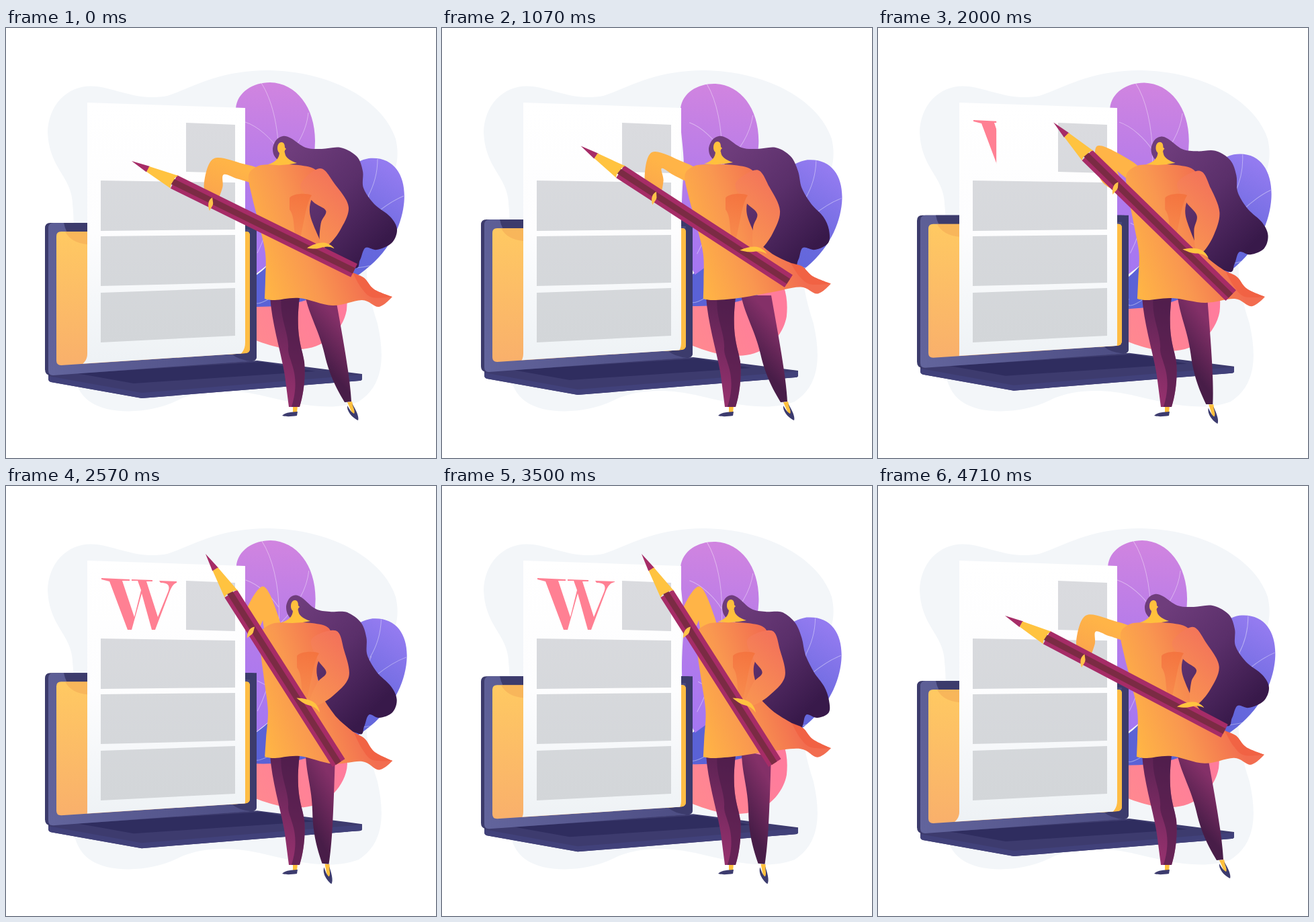
These frames come from a looping animation (640x640 px, 4780 ms). An HTML page:

```html
<!DOCTYPE html>
<html lang="en">
<head>
<meta charset="utf-8">
<title>Writing</title>
<style>
html, body { margin: 0; width: 100%; height: 100%; overflow: hidden; background: #fff; }
svg { display: block; width: 100vw; height: 100vh; }
.vein { fill: none; stroke: #fff; stroke-opacity: .4; stroke-width: 1; }
</style>
</head>
<body>
<svg viewBox="0 0 640 640">
<defs id="defs">
  <clipPath id="screenClip"><path id="clipShape" d="M0 0H640V466L0 507Z"/></clipPath>
  <clipPath id="letterClip"><rect id="wipe" x="140" y="130" width="118" height="90"/></clipPath>
</defs>

<path fill="#f3f6f9" d="M62 155C63 112 95 82 135 87C170 92 198 109 240 101C275 90 315 63 390 63C480 64 560 105 580 165C592 215 560 240 550 290C525 345 540 400 553 440C564 490 562 532 525 556C480 573 425 557 385 548C335 536 295 538 262 551C225 571 180 574 150 567C110 556 105 535 96 500C88 420 106 320 99 262C98 220 64 210 62 155Z"/>

<path id="pink" fill="url(#gPink)" d="M340 415L400 340H480C505 365 510 392 507 420C501 452 472 478 436 478C408 479 385 471 340 452Z"/>
<g id="blue">
  <path fill="url(#gBlue)" d="M340 384C420 365 470 206 540 194C584 190 600 230 590 275C580 320 545 372 450 404C412 416 380 416 340 414Z"/>
  <path class="vein" d="M553 195Q553 225 538 252M592 250Q572 258 548 278M522 357Q550 354 568 345M540 250Q520 310 440 370T372 400"/>
</g>
<g id="purple">
  <path fill="url(#gPurple)" d="M342 120C344 95 368 81 393 81C432 82 460 118 460 168C459 230 430 320 386 355L372 366C345 320 348 255 350 212C350 178 341 150 342 120Z"/>
  <path class="vein" d="M380 82C395 105 406 145 406 195C406 240 392 300 374 335M450 126C447 155 432 180 407 205M356 140C375 146 395 165 405 180M374 290L386 296"/>
</g>

<g id="laptop">
  <path fill="#3d3b6e" d="M63 516L374 495L530 515V522Q530 525 526 525L202 551L67 527Q63 526 63 522Z"/>
  <path fill="#41417a" d="M63 518L202 543L530 516V522Q530 525 526 525L202 551L67 527Q63 526 63 522Z"/>
  <path fill="#2f2d5f" d="M106 514L380 497L460 511L190 529Z"/>
  <path fill="#3c3b6c" d="M66 290H366Q373 290 373 297V488Q373 495 366 496L67 517Q58 517 58 508V298Q58 290 66 290Z"/>
  <path fill="url(#gFrame)" d="M71 290H362Q369 290 369 297V488Q369 495 362 496L70 517Q63 517 63 510V298Q63 290 71 290Z"/>
  <path fill="#3c3b6c" d="M86 290H373V490Q373 495 366 496Q345 494 336 485L363 300H121V322Q92 320 86 290Z"/>
  <path fill="url(#gScreen)" d="M82 303H358Q363 303 363 309V477Q363 483 357 484L82 502Q75 502 75 495V310Q75 303 82 303Z"/>
  <path fill="#ffbd45" d="M330 303H358Q363 303 363 309V477Q363 483 357 484L330 486Z"/>
  <path fill="#f0a050" opacity=".45" d="M88 303H121V322Q97 320 88 303Z"/>
</g>

<g clip-path="url(#screenClip)">
  <path fill="url(#gPage)" d="M121 111L356 119V468C356 479 351 485 343 490L98 510C114 502 121 496 121 485Z"/>
  <path fill="url(#gBox)" d="M268 141L341 144V216L268 214ZM141 227L341 230V300L141 302ZM141 310L341 308V379L141 384ZM141 394L341 387V458L141 468Z"/>
  <path clip-path="url(#letterClip)" fill="#ff8093" d="M142 137L184 139V141L173 141L191 195L201 155L196 141L187 141V139L218 140V142L209 142L226 195L241 158C245 148 241 144 230 144L228 141L257 142V143C250 144 247 149 244 156L222 214L217 214L202 160L187 214L181 214L154 142L142 139Z"/>
</g>

<path id="hair" fill="url(#gHair)"/>
<path fill="#ffc03d" d="M427 562H434L433 573H427Z"/>
<path fill="#3c3b6e" d="M411 577C417 571 426 572 434 571L433 577C426 578 418 579 411 577Z"/>
<g id="leg">
  <path fill="#ffc03d" d="M508 557L515 556L520 575L515 573Z"/>
  <path fill="#3c3b6e" d="M508 562C507 572 517 581 524 584C526 578 520 567 515 559C517 565 520 571 518 574C514 572 511 567 508 562Z"/>
  <path fill="url(#gLegR)" d="M445 398C452 430 466 450 474 485C482 520 494 540 504 557L514 556C512 520 503 470 490 398Z"/>
</g>
<path fill="url(#gLegL)" d="M393 400C396 445 412 490 416 525L421 564H437C443 545 446 520 444 497C441 475 430 460 437 400Z"/>
<path fill="#4a1c48" opacity=".6" d="M410 400C406 430 422 455 420 478C420 495 440 515 425 564H437C443 545 446 520 444 497C441 475 430 460 437 400Z"/>
<path id="armL" fill="url(#gArm)"/>
<path id="dress" fill="url(#gDress)"/>
<path id="tail" fill="#f05f40" opacity=".75"/>
<path id="armR" fill="url(#gSleeve)"/>
<path id="fold" fill="url(#gFold)" d="M422 253C426 246 448 245 455 249C446 262 444 290 437 316C424 310 433 285 422 270Z"/>
<g id="head" fill="#ffc03d">
  <path d="M390 203Q407 198 407 185L415 185Q415 195 433 201Q412 206 390 203Z"/>
  <path d="M404 179C404 173 407 170 410 170C414 170 415 174 415 178L417 180L415 182C415 186 412 188 409 187C406 186 404 183 404 179Z"/>
</g>
<g id="pencil">
  <path fill="#a62c67" d="M0 0L28 -5L27 5ZM70 -11H369V11H70Z"/>
  <path fill="#ffc340" d="M27 -4.5L72 -11Q67 -6 70 0Q66 6 70 11L27 4.5Z"/>
  <path fill="#7b2b44" d="M69 -4H369V5H68Z"/>
</g>
<path id="handL" fill="#ffc34a" d="M-2 -8C-9 -4 -9 5 -6 12C-4 7 0 4 -1 -1Z"/>
<path id="handR" fill="#ffc340" d="M-25 2C-15 -2 -4 -4 4 -1C10 2 14 6 15 9C8 4 2 4 -5 5C-12 6 -18 4 -25 2Z"/>
</svg>

<script>
const T = 4780;
const $ = id => document.getElementById(id);
const clamp = v => Math.min(1, Math.max(0, v));

// Gradients: id, x1 y1 x2 y2, then colours spread evenly
function grad(id, [x1, y1, x2, y2], ...colors) {
  const stops = colors.map((c, i) => `<stop offset="${i / (colors.length - 1)}" stop-color="${c}"/>`).join('');
  $('defs').insertAdjacentHTML('beforeend',
    `<linearGradient id="${id}" gradientUnits="userSpaceOnUse" x1="${x1}" y1="${y1}" x2="${x2}" y2="${y2}">${stops}</linearGradient>`);
}
grad('gPink', [480, 400, 380, 470], '#ff7c9c', '#ff8890');
grad('gBlue', [560, 200, 440, 400], '#937bf0', '#6668dd', '#5a62d6');
grad('gPurple', [400, 85, 385, 360], '#d084e0', '#b47bea', '#a577f2');
grad('gFrame', [63, 500, 373, 400], '#62649c', '#4a4a80');
grad('gScreen', [90, 303, 100, 500], '#ffc962', '#f9b06b');
grad('gPage', [0, 111, 0, 495], '#fff', '#fdfdfe', '#eef2f5');
grad('gBox', [0, 141, 0, 468], '#dadbdf', '#d3d6d9');
grad('gHair', [425, 180, 560, 320], '#6f3d7c', '#5a2f6a', '#38194a');
grad('gLegL', [440, 410, 405, 545], '#5c2354', '#92306c');
grad('gLegR', [500, 440, 455, 480], '#843068', '#481d48');
grad('gArm', [360, 215, 320, 300], '#ffb447', '#f89a50');
grad('gDress', [372, 350, 510, 300], '#ffb545', '#f99750', '#f26d50');
grad('gSleeve', [420, 310, 500, 230], '#fa9a50', '#f3735a');
grad('gFold', [430, 310, 450, 245], '#f78a4c', '#f4733f');

// Points "x,y"; a trailing "!" marks a sharp corner
const pts = s => s.split(' ').map(p => [...p.replace('!', '').split(',').map(Number), p.endsWith('!') ? 0 : 1]);

// Closed smooth curve through the points
function spline(p) {
  const n = p.length, at = i => p[(i + n) % n];
  const tan = (i, j) => (at(i + 1)[j] - at(i - 1)[j]) / 6 * (at(i)[2] ?? 1);
  let d = `M${p[0][0]} ${p[0][1]}`;
  for (let i = 0; i < n; i++) {
    const a = at(i), b = at(i + 1);
    d += `C${a[0] + tan(i, 0)} ${a[1] + tan(i, 1)} ${b[0] - tan(i + 1, 0)} ${b[1] - tan(i + 1, 1)} ${b[0]} ${b[1]}`;
  }
  return d + 'Z';
}

// Eased values through [time, ...values] keys
function track(t, ...keys) {
  const i = keys.findIndex(k => t < k[0]);
  if (i < 1) return keys.at(i).slice(1);
  const a = keys[i - 1], b = keys[i], x = (t - a[0]) / (b[0] - a[0]);
  return a.slice(1).map((v, j) => v + (b[j + 1] - v) * x * x * (3 - 2 * x));
}

// Plane vectors
const add = (p, v, k = 1) => [p[0] + v[0] * k, p[1] + v[1] * k];
const mid = (p, q) => [(p[0] + q[0]) / 2, (p[1] + q[1]) / 2];
const unit = v => { const l = Math.hypot(...v) || 1; return [v[0] / l, v[1] / l]; };
const dir = (p, q) => unit(add(q, p, -1));

// Tapered two-bone limb; the elbow follows from the shoulder and the wrist.
// radii: shoulder, upper arm, elbow, forearm, wrist
function limb(shoulder, wrist, upper, lower, radii, inner) {
  const d = Math.hypot(wrist[0] - shoulder[0], wrist[1] - shoulder[1]);
  const along = (upper ** 2 - lower ** 2 + d * d) / (2 * d);
  const out = Math.sqrt(Math.max(0, upper ** 2 - along ** 2));
  const [ux, uy] = dir(shoulder, wrist);
  const elbow = add(add(shoulder, [ux, uy], along), [uy, -ux], out * bendSide(ux));
  const side = bendSide(ux);
  const normal = (p, q) => { const [x, y] = dir(p, q); return [y * side, -x * side]; };
  const n1 = normal(shoulder, elbow), n2 = normal(elbow, wrist), ne = unit(add(n1, n2));
  const spine = [shoulder, mid(shoulder, elbow), elbow, mid(elbow, wrist), wrist];
  const normals = [n1, n1, ne, n2, n2];
  const edge = k => spine.map((p, i) => add(p, normals[i], radii[i] * k));
  return [...edge(1), ...edge(-inner).reverse()];
}
const bendSide = () => 1;

const hair = pts('403,195 397,181 402,167 412,161 424,164 446,178 470,180 498,178 522,191 531,213 532,238 548,262 572,281 582,300 574,320 552,330 535,327 527,345 518,357 470,330 425,210');
const dress = pts('392,203 372,207 361,220 366,250 376,290 386,335 386,375 385,403! 400,405 437,402 486,413 530,405 555,415 575,400! 548,389 533,372 516,364 490,345 470,321! 453,280 455,254 468,235 462,212 435,204');

// The head end of the hair leans, the loose end drops and ripples
const waveHair = (lean, sway) => hair.map(([x, y]) => {
  const u = clamp((x - 397) / 185);
  const ripple = Math.cos(2 * Math.PI * (y - 193) / 100);
  return [x + 20 * lean * (1 - u) - 7 * sway * u * u * ripple, y + 18 * lean * u];
});

// Shoulders lean over a fixed hem; the train flutters
const waveDress = (lean, sway) => dress.map(([x, y, k]) => {
  const v = clamp((y - 204) / 195), low = clamp((y - 320) / 60);
  return [
    x + 20 * lean * (1 - v) ** 1.5 + 4 * sway * v,
    y + low * (10 * lean * clamp((x - 470) / 100) - 20 * sway * clamp((x - 440) / 45)),
    k];
});

const draw = (id, p) => $(id).setAttribute('d', spline(p));
const move = (id, x, y, a = 0) => $(id).setAttribute('transform', `translate(${x} ${y}) rotate(${a})`);
const turn = (id, a, x, y) => $(id).setAttribute('transform', `rotate(${a} ${x} ${y})`);

function render(t) {
  const phase = 2 * Math.PI * t / T;
  const sway = (1 - Math.cos(2 * phase)) / 2;
  const [lean] = track(t, [0, 0], [1600, 0], [2430, 1], [3900, 1], [4650, 0], [T, 0]);
  const [shown] = track(t, [0, 0], [1600, 0], [2690, 1], [4070, 1], [4640, 0], [T, 0]);
  const [px, py, angle] = track(t,
    [0, 187, 198, 26.2], [710, 205, 152, 41.4], [1430, 208, 199, 24.7], [2440, 297, 101, 57.5],
    [3900, 297, 101, 57.5], [4070, 295, 101, 58.4], [4710, 189, 193, 27.7], [T, 187, 198, 26.2]);

  turn('purple', 2 * sway, 340, 500);
  turn('blue', 3.7 * Math.sin(2 * phase), 430, 380);
  move('pink', 6 * sway, 10 * sway);

  const bob = 6 * (Math.cos(phase) - 1);
  move('laptop', 0, bob);
  move('clipShape', 0, bob);
  $('wipe').setAttribute('width', 118 * shown);

  draw('hair', waveHair(lean, sway));
  const body = waveDress(lean, sway);
  draw('dress', body);
  const [tip, top, bend, root] = body.slice(13, 17);
  draw('tail', [tip, top, bend, [...root.slice(0, 2), 0], add(bend, [-4, 15]), add(top, [-3, 12])]);
  turn('leg', 12 * lean, 465, 400);
  move('head', 20 * lean, -sway);
  move('fold', 11 * lean, 0);

  // Both hands hold on to the pencil
  const r = angle * Math.PI / 180, c = Math.cos(r), s = Math.sin(r);
  const grip = (along, off) => [px + along * c - off * s, py + along * s + off * c];
  const left = grip(137, 2), right = grip(312 - 1.2 * (angle - 25), -15);
  // The left arm is solved from hand to shoulder so that both elbows bend outwards
  draw('armL', limb(left, [375 + 20 * lean, 225], 50, 57, [8, 20, 20, 17, 14], .4).map(p => p) && leftArm(left, lean));
  draw('armR', limb([452 + 20 * lean, 222], right, 62, 56, [20, 22, 18, 16, 6], .9));
  move('pencil', px, py, angle);
  move('handL', ...left, (angle - 26) * .7);
  move('handR', ...right, angle - 35);
}

// Mirrored so that the elbow hangs below the hand
function leftArm([hx, hy], lean) {
  const flip = ([x, y]) => [-x, y];
  return limb(flip([375 + 20 * lean, 225]), flip([hx, hy]), 57, 50, [14, 17, 20, 20, 8], .4).map(flip);
}

const start = performance.now();
function tick() {
  render((performance.now() - start) % T);
  requestAnimationFrame(tick);
}
tick();
</script>
</body>
</html>
```
